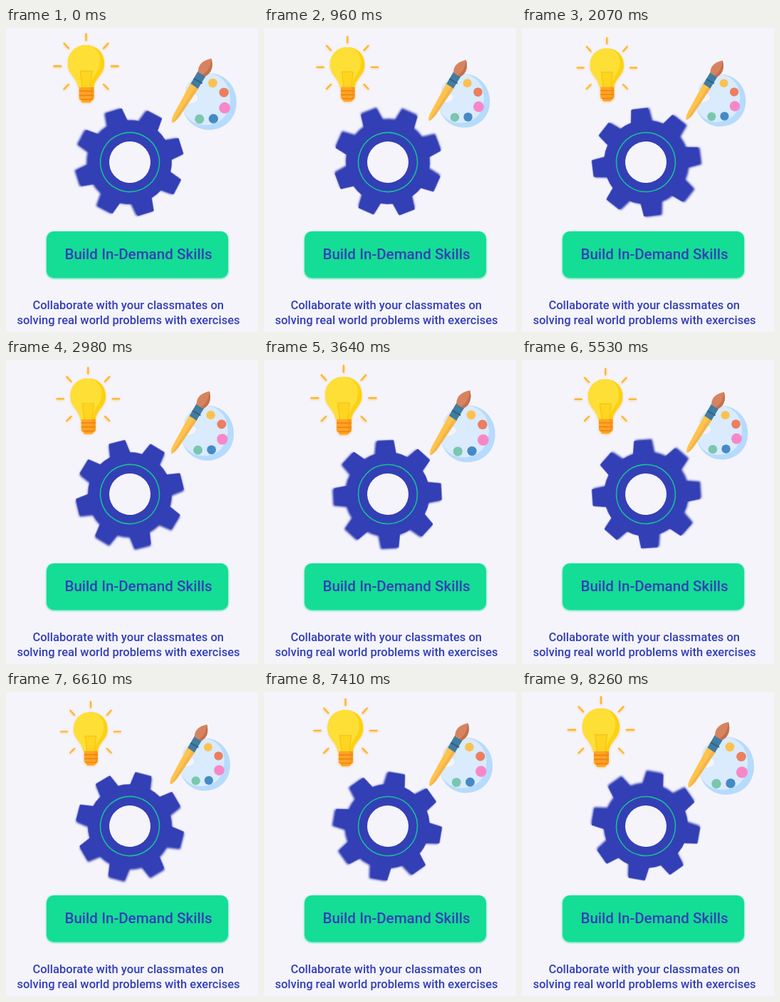
An HTML page that plays this animation: 354x426 px, repeating every 8.29 s.

```html
<!DOCTYPE html>
<html lang="en">
<head>
<meta charset="utf-8">
<title>Build In-Demand Skills</title>
<style>
  html, body { margin: 0; width: 100%; height: 100%; overflow: hidden; background: #f5f4fb; }
  svg { display: block; width: 100%; height: 100%; }
  text { font-family: Roboto, Inter, sans-serif; font-weight: 500; fill: #333fb8; text-anchor: middle; }
  .title { font-size: 20.6px; }
  .note { font-size: 16.5px; }
  #button { filter: drop-shadow(0 1.5px 1.5px #14dd95); }
  #wheel { filter: drop-shadow(-1.2px 1.6px 1.4px #333fb5); }
  #bulb { filter: drop-shadow(0 1px 1.5px #ffb02899); }
</style>
</head>
<body>
<svg viewBox="0 0 354 426">
  <defs>
    <clipPath id="glass">
      <path d="M111 23C96 23 85 34 85 49C85 65 98 68 100 83H122C124 68 137 65 137 49C137 34 126 23 111 23Z"/>
    </clipPath>
  </defs>

  <g id="icons">
    <g id="bulb">
      <path d="M111 7V16M65 53H75M147 53H157M79.500 20.500L86 27.500M142.500 20.500L136 27.500M79.500 85.500L86 79M142.500 85.500L136 79"
            stroke="#ffb52c" stroke-width="2.400" stroke-linecap="round"/>
      <g clip-path="url(#glass)">
        <rect x="84" y="22" width="54" height="63" fill="#fcd20f"/>
        <path d="M84 22H113C126 26 132 36 131 48C130 63 117 68 117 85H84Z" fill="#fddf36"/>
      </g>
      <path d="M105.500 84L102.500 60H119.500L116.500 84" fill="#ffd51f" stroke="#f5c31c" stroke-width="1.300"/>
      <path d="M101 83H122V99Q122 101 119 101Q118 105 115 105H107Q104 105 104 101Q101 101 101 99Z" fill="#ffa524"/>
      <path d="M101 88.500H122M101 94.500H122M103 100.500H120" stroke="#ee8414" stroke-width="1.800"/>
      <path d="M117 83H122V99L118 104Z" fill="#f08a14" opacity=".45"/>
    </g>

    <g id="palette">
      <path d="M286 63C310 63 326 82 326 104C326 128 309 144 286 144C266 144 248 127 248 105C253 107 266 108 270 101C273 95 266 92 260 92C253 91 251 87 255 81C262 70 273 63 286 63Z" fill="#b6dbfc"/>
      <path d="M286 63C305 65 317 80 317 99C317 122 303 137 281 137C262 137 248 123 248 105C253 107 266 108 270 101C273 95 266 92 260 92C253 91 251 87 255 81C262 70 273 63 286 63Z" fill="#d9ebfc"/>
      <g id="paints"></g>
      <path d="M234 134Q232 130 236 122L260.500 77L272 84L243.500 126Q237 134 234 134Z" fill="#ffc34e"/>
      <path d="M235 133Q239 131 243.500 126L272 84L268 81.500Z" fill="#f6b447"/>
      <path d="M260.500 78L271 60L282 67L271 85Z" fill="#427ca1"/>
      <path d="M265 70.500L277 77.500" stroke="#315f84" stroke-width="2"/>
      <path d="M271 61C271 51 277 45 290 42C293 52 291 62 282 67Q275 65 271 61Z" fill="#d6835f"/>
      <path d="M290 42C293 52 291 62 282 67L278 64.500C286 60 289 52 290 42Z" fill="#c56f4d"/>
    </g>
  </g>

  <g id="gear">
    <path id="wheel" fill="#333fb5" stroke="#333fb5" stroke-width="3" stroke-linejoin="round"/>
    <circle r="41.500" fill="none" stroke="#17bd9b" stroke-width="1.600"/>
    <circle r="29" fill="#f5f4fb"/>
  </g>

  <rect id="button" x="57" y="285" width="255" height="65" rx="10" fill="#14dd95"/>
  <text class="title" x="186" y="324">Build In-Demand Skills</text>
  <text class="note" x="171.700" y="394">Collaborate with your classmates on</text>
  <text class="note" x="172" y="415">solving real world problems with exercises</text>
</svg>
<script>
const $ = id => document.getElementById(id);
const LOOP = 8290;

// [time, angle] of the gear
const spin = [[0, 27.5], [960, 114], [2070, 218], [2980, 301], [4350, 417.7], [6610, 644.5], [8290, 823]];
// [time, shrink] at the turning points of the icons
const pulse = [[-720, 0], [1850, 1], [4120, 0], [6270, 1], [8300, 0]];

const smooth = u => (1 - Math.cos(Math.PI * u)) / 2;

function sample(keys, t, ease = u => u) {
  const i = Math.max(1, keys.findIndex(k => k[0] >= t));
  const [t0, a] = keys[i - 1], [t1, b] = keys[i];
  return a + (b - a) * ease((t - t0) / (t1 - t0));
}

function gearPath() {
  const tooth = [[-13, -56], [-10.5, -74], [10.5, -74], [13, -56]];
  let d = "";
  for (let i = 0; i < 8; i++) {
    const c = Math.cos(i * Math.PI / 4), s = Math.sin(i * Math.PI / 4);
    tooth.forEach(([x, y], j) => {
      const cmd = j ? "L" : i ? "A57.5 57.5 0 0 1 " : "M";
      d += `${cmd}${(x * c - y * s).toFixed(2)} ${(x * s + y * c).toFixed(2)}`;
    });
  }
  return d + "A57.5 57.5 0 0 1 -13 -56Z";
}

$("wheel").setAttribute("d", gearPath());
$("paints").innerHTML = [
  [292, 77, 6.5, "#fcc150"], [308, 90.5, 6.8, "#eb7f60"], [309, 112.5, 8, "#f887c8"],
  [293, 128, 6.7, "#458ac6"], [273, 128.5, 6.7, "#7ac6ae"]
].map(([x, y, r, fill]) => `<circle cx="${x}" cy="${y}" r="${r}" fill="${fill}"/>`).join("");

function draw(now) {
  const t = now % LOOP;
  const scale = 1 - 0.095 * sample(pulse, t, smooth);
  $("icons").setAttribute("transform", `translate(201 81) scale(${scale}) translate(-201 -81)`);
  $("gear").setAttribute("transform", `translate(174 188) rotate(${sample(spin, t)})`);
  requestAnimationFrame(draw);
}
draw(performance.now());
</script>
</body>
</html>
```
